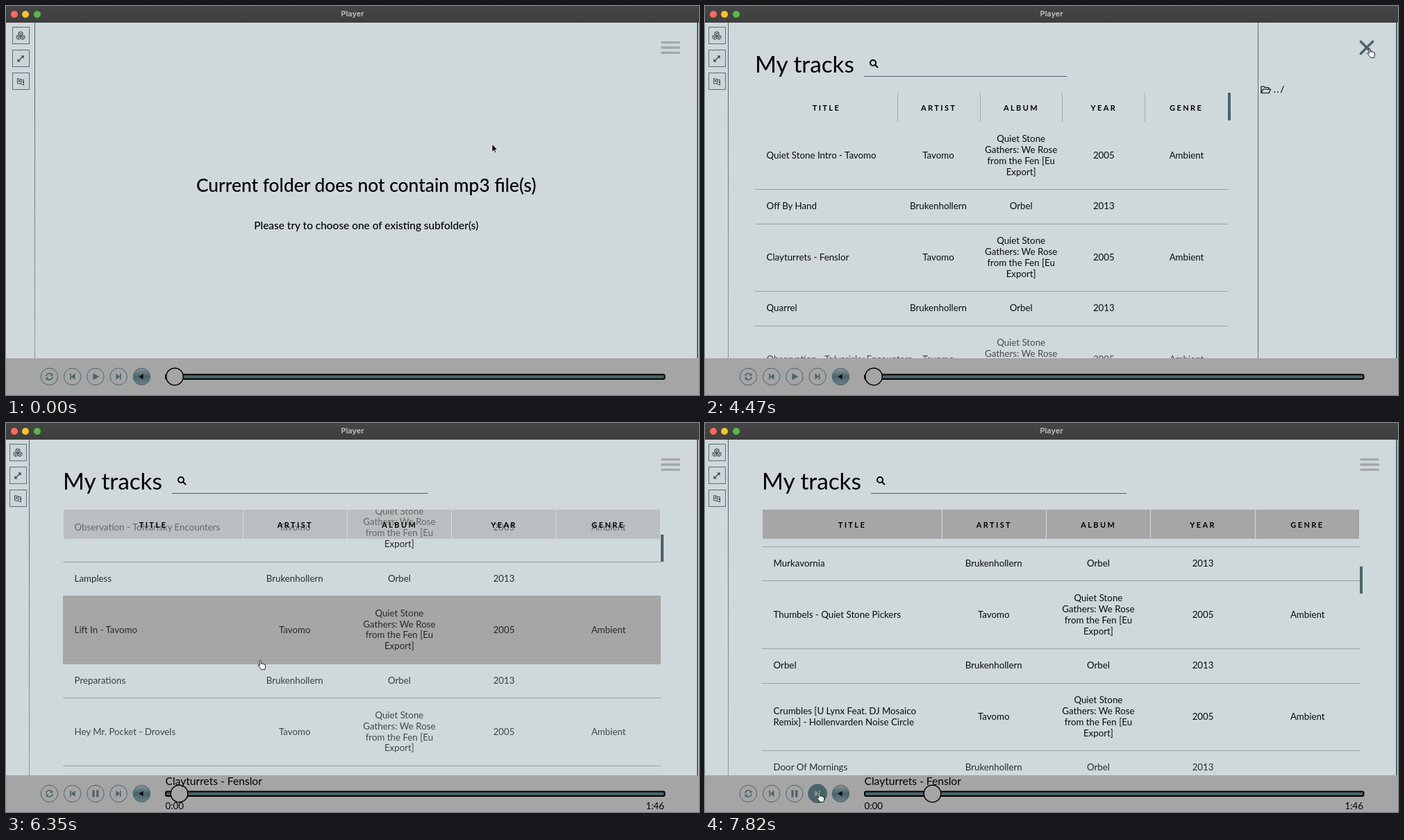
Recreate the animation shown at these times as an HTML page. Size 998 by 561 pixels, loop 8000 ms.

```html
<!DOCTYPE html>
<html lang="en">
<head>
<meta charset="utf-8">
<title>Player</title>
<style>
  html, body { margin: 0; width: 100%; height: 100%; overflow: hidden; }
  body { --dark: #4a646b; --grey: #a6a6a6; --bg: #cfd8db; font: 13.3px/15.9px Lato, sans-serif; color: #000; }
  div, svg { position: absolute; box-sizing: border-box; }
  #stage { width: 998px; height: 561px; background: var(--bg); overflow: hidden; }
  #bar { width: 998px; height: 23.5px; background: linear-gradient(#464646, #3e3e3e); color: #c2c2c2;
    font: 600 11px/23px Inter, sans-serif; text-align: center; }
  #bar i { position: absolute; top: 6.6px; width: 10.4px; height: 10.4px; border-radius: 50%; }
  #side { top: 24px; height: 484px; border-right: 1px solid; border-image: linear-gradient(var(--dark), #8f9a9d) 1; }
  #side div { left: 50%; margin-left: -12px; width: 25px; height: 25px; border: 1px solid #5a7077; background: #ccd5d8; }
  #side svg { left: 4.5px; top: 4.5px; }
  #edge { left: 995px; top: 23.5px; width: 2px; height: 485px; background: var(--dark); }
  #empty { left: 42px; text-align: center; font-weight: 500; white-space: nowrap; }
  #empty div { width: 100%; }
  #panel { top: 23.5px; height: 485px; overflow: hidden; border-left: 1px solid #5c7076; background: var(--bg); }
  .item { left: 0; width: 100%; height: 24.1px; padding-left: 22.4px; font-weight: 500; line-height: 23.6px; white-space: nowrap; }
  .item.on { background: var(--dark); color: #fff; }
  .item svg { left: 3px; top: 6px; }
  #heading { top: 63px; font-size: 33.25px; line-height: 40px; white-space: nowrap; }
  #search { top: 74px; height: 28px; border-bottom: 1px solid var(--dark); }
  #table { top: 125px; height: 383px; overflow: hidden; }
  .row { left: 0; width: 100%; display: grid; grid-template-columns: 30% repeat(4, 17.5%); align-items: center;
    text-align: center; padding: 16.4px 0; border-bottom: 1px solid #9ba1a3; white-space: nowrap; }
  .row.on { background: var(--grey); }
  .row span:first-child { text-align: left; padding-left: 16.5px; }
  #head { left: 1px; right: 1px; height: 42px; display: grid; grid-template-columns: 30% repeat(4, 17.5%); text-align: center;
    font-size: 11px; font-weight: 700; letter-spacing: 2.4px; line-height: 43px; }
  #head span + span { height: 42px; border-left: 1px solid var(--sep); }
  #thumb { width: 3.5px; height: 39.5px; background: var(--dark); }
  #foot { top: 508px; width: 998px; height: 53px; background: #a5a5a5; }
  #song { left: 229.5px; top: -1px; font-size: 15.6px; line-height: 19px; }
  #time, #total { top: 36.5px; left: 229.5px; }
  #total { left: auto; right: 50px; }
  #over { left: 0; top: 0; }
</style>
</head>
<body>
<div id="stage">
  <div id="empty">
    <div style="top:242px;font-size:26.4px;line-height:32px">Current folder does not contain mp3 file(s)</div>
    <div style="top:307px;font-size:15.45px;line-height:18.5px">Please try to choose one of existing subfolder(s)</div>
  </div>
  <div id="tracks">
    <div id="heading">My tracks</div>
    <div id="search"><svg width="30" height="28" fill="none" stroke="#000" stroke-width="2"><circle cx="13" cy="8" r="4"/><path d="M16 11l4 4"/></svg></div>
    <div id="table"><div id="rows" style="width:100%"></div>
      <div id="head"><span>TITLE</span><span>ARTIST</span><span>ALBUM</span><span>YEAR</span><span>GENRE</span></div></div>
    <div id="thumb"></div>
  </div>
  <div id="side"></div>
  <div id="panel"></div>
  <div id="edge"></div>
  <div id="bar">Player<i style="left:6.5px;background:#fe6a5e"></i><i style="left:23px;background:#fbc02e"></i><i style="left:39.5px;background:#58b947"></i></div>
  <div id="foot">
    <svg id="controls" width="998" height="53"></svg>
    <div id="song">Clayturrets - Fenslor</div><div id="time">0:00</div><div id="total">1:46</div>
  </div>
  <svg id="over" width="998" height="561">
    <g id="burger" stroke-width="3.4" stroke-linecap="round"><path d="M-12.3 0h24.6"/><path d="M-12.3 0h24.6"/><path d="M-12.3 0h24.6"/></g>
    <path id="arrow" d="M0 0v11.5l2.7-2.4 1.8 4 1.7-.8-1.8-3.8h3.4z" fill="#000" stroke="#fff" stroke-width=".8"/>
    <path id="hand" d="M0 1.2q1-2 2 0l.6 4.3 1-.7 1 .9 1.3-.5.8 1 1.4 0 .7 2.8-.7 3-.2 1.6H2.6L.4 10.4-2.2 7.6q.2-1.3 1.5-.6l1.3 1z" fill="#fff" stroke="#111" stroke-width=".9"/>
  </svg>
</div>
<script>
const $ = id => document.getElementById(id);
const clamp = x => Math.min(1, Math.max(0, x));
const smooth = x => x * x * (3 - 2 * x);
const ease = x => 1 - Math.pow(1 - clamp(x), 2.6);

// Interpolates [time, value...] points.
function track(points, t, curve = x => x) {
  const i = points.findIndex(p => p[0] > t);
  if (i === 0) return points[0].slice(1);
  if (i < 0) return points[points.length - 1].slice(1);
  const a = points[i - 1], b = points[i], k = curve((t - a[0]) / (b[0] - a[0]));
  return a.slice(1).map((v, j) => v + (b[j + 1] - v) * k);
}

const PAGE = 3950, PLAY = 5450, NEXT = 7680;
const TALL = 97.4, SHORT = 49.7, PAIR = TALL + SHORT;
const cursorPath = [[880, 700, 199], [1500, 964, 58], [1760, 964, 58], [2060, 850, 387], [2110, 850, 387], [2240, 850, 240],
  [2530, 850, 240], [2950, 840, 197], [3410, 840, 197], [3480, 838, 207], [3700, 842, 144], [4000, 842, 144], [4500, 957, 60],
  [4760, 957, 60], [5230, 370, 329], [5410, 370, 329], [5590, 365, 342], [7000, 365, 342], [7600, 163, 533]];
const scrollPath = [[6060, 0], [6150, 140], [6350, 358], [6600, 490], [6820, 577], [7100, 700], [7400, 790], [7650, 821.7]];
const cursorAt = t => track(cursorPath, t, smooth);
const scrollAt = t => track(scrollPath, t)[0];

// Folder lists with the time each one appears
const lists = [
  [0, "Applications Desktop Documents Downloads Library Movies Music Pictures Postman Public getting-started"],
  [2110, ".git .husky app build config node_modules public"],
  [3050, "assets client server"],
  [PAGE, ""]
].map(([t, s]) => [t, ["../", ...s.split(" ").filter(Boolean)]]);

const titles = ["Quiet Stone Intro - Tavomo", "Off By Hand", "Clayturrets - Fenslor", "Quarrel",
  "Observation - Tolvarisky Encounters", "Lampless", "Lift In - Tavomo", "Preparations", "Hey Mr. Pocket - Drovels",
  "Abrasions", "Stair - Brown Ferns", "Murkavornia", "Thumbels - Quiet Stone Pickers", "Orbel",
  "Crumbles [U Lynx Feat. DJ Mosaico<br>Remix] - Hollenvarden Noise Circle", "Door Of Mornings"];
const album = "Quiet Stone<br>Gathers: We Rose<br>from the Fen [Eu<br>Export]";

const rows = titles.map((title, i) => {
  const odd = i % 2, top = 42.5 + (i >> 1) * PAIR + odd * TALL, height = odd ? SHORT : TALL;
  const cells = odd ? [title, "Brukenhollern", "Orbel", 2013, ""] : [title, "Tavomo", album, 2005, "Ambient"];
  const el = document.createElement("div");
  el.className = "row";
  el.style.cssText = `top:${top}px;height:${height}px`;
  el.innerHTML = cells.map(c => `<span>${c}</span>`).join("");
  $("rows").append(el);
  let enter = PAGE;
  while (enter < 8000 && scrollAt(enter) + 383 < top + height / 2) enter += 20;
  return { el, top, height, enter };
});

const cube = (x, y) => `<path d="M${x} ${y - 3.2}l3 1.5v3.3l-3 1.6-3-1.6v-3.3zM${x - 3} ${y - 1.7}l3 1.5 3-1.5M${x} ${y - .2}v3.2"/>`;
const sideIcons = [cube(7, 4) + cube(4, 9) + cube(10, 9),
  '<path d="M3.5 10.5l7-7M7.5 3h3.5v3.5M3 7.5v3.5h3.5" stroke-width="1.2"/>',
  '<path d="M2.5 2.5l5 1v7l-5-1zM7.5 4.5h4v7.5l-4-1.5"/><path d="M4 7.5l1-3 1 3M9 7h1.5v2"/>'];
$("side").innerHTML = sideIcons.map((s, i) =>
  `<div style="top:${6 + 33.2 * i}px"><svg width="14" height="14" fill="none" stroke="#333e42" stroke-width=".9">${s}</svg></div>`).join("");

const folder = '<svg width="16" height="12" fill="none" stroke="currentColor" stroke-width="1.1" stroke-linejoin="round"><path d="M1 10.5V1.8q0-.8.8-.8h3l1.5 1.5h4.9q.8 0 .8.8V5M1 10.5l2.7-5.5h11l-2.7 5.5z"/></svg>';

const icons = [
  '<path d="M-4.5-.5a4.5 4.5 0 0 1 8.3-2M4.5.5a4.5 4.5 0 0 1-8.3 2" fill="none" stroke="#4a646b" stroke-width="1.5"/><path d="M4.8-5v4H1zM-4.8 5V1H-1z"/>',
  '<path d="M-3.5-4.5h1.7v9h-1.7zM3.8-4.5v9L-2 0z"/>',
  '', '<path d="M3.5-4.5H1.8v9h1.7zM-3.8-4.5v9L2 0z"/>',
  '<path d="M-3-1.5h2L2-4v8L-1 1.5h-2z" fill="#000"/>'];
const playIcon = '<path d="M-3.5-5L5.5 0l-9 5z"/>';
const pauseIcon = '<path d="M-4.5-5h3.3V5h-3.3zM1.2-5h3.3V5H1.2z"/>';

function drawControls(t) {
  const knob = t < 6060 ? 243 : track([[7650, 249.5], [7820, 327.5]], t)[0];
  $("controls").innerHTML =
    `<defs><linearGradient id="mute" x2="0" y2="1"><stop stop-color="#87979b"/><stop offset=".5" stop-color="#4a646b"/><stop offset="1" stop-color="#6d8187"/></linearGradient></defs>` +
    icons.map((icon, i) => {
      const on = i === 3 && t >= NEXT;
      const fill = on ? "#4a646b" : i === 4 ? "url(#mute)" : "none";
      const shape = i === 2 ? (t < PLAY ? playIcon : pauseIcon) : icon;
      return `<g transform="translate(${62.4 + 33.25 * i} 26.5)"><circle r="${on ? 13.5 : 12.2}" fill="${fill}" stroke="#4a646b"/><g fill="${on ? "#8b989c" : "#4a646b"}">${shape}</g></g>`;
    }).join("") +
    `<rect x="230" y="23.5" width="718.5" height="6.5" rx="2" fill="#4a646b" stroke="#000" stroke-width="2"/>` +
    `<circle cx="${knob}" cy="26.5" r="12.3" fill="#a5a5a5" stroke="#000" stroke-width="1.5"/>`;
}

function drawPanel(t, left, cx, cy) {
  const panel = $("panel");
  panel.style.left = left + "px";
  panel.style.width = 995.5 - left + "px";
  panel.style.display = left < 995 ? "" : "none";
  const names = lists.filter(l => l[0] <= t).pop()[1];
  const over = cx > left ? Math.floor((cy - 109.4) / 24.1) : -1;
  panel.innerHTML = names.map((n, i) =>
    `<div class="item${i === over ? " on" : ""}" style="top:${85.9 + 24.1 * i}px;${i ? "" : "letter-spacing:1.5px"}">${folder}${n}</div>`).join("");
}

function drawTracks(t, left, cx, cy) {
  const space = left - 34, x = 34 + space * .05, width = space * .9 - 4.3, scroll = scrollAt(t);
  const place = (id, l, w) => { $(id).style.left = l + "px"; if (w) $(id).style.width = w + "px"; };
  place("heading", x);
  place("search", x + 157, space * .383);
  place("table", x, width);
  place("thumb", x + width + .3);
  $("thumb").style.top = 125 + scroll * .0995 + "px";
  $("rows").style.top = -scroll + "px";
  // Hover is refreshed only now and then while scrolling.
  const seen = t < 6100 ? scroll : scrollAt(6100 + Math.floor((t - 6100) / 250) * 250);
  const inside = cx > x && cx < x + width && cy > 167 && cy < 508;
  const y = cy - 125 + seen;
  for (const r of rows) {
    r.el.classList.toggle("on", inside && y >= r.top && y < r.top + r.height);
    r.el.style.color = `rgba(0,0,0,${.65 + .3 * clamp((t - r.enter) / 500)})`;
  }
  const h = clamp((t - 6080) / 540);
  $("head").style.background = `rgba(166,166,166,${h})`;
  $("head").style.setProperty("--sep", h ? "#d3dcdf" : "#a5acae");
}

function drawBurger(p, cx, cy) {
  const hover = Math.abs(cx - 957) < 18 && Math.abs(cy - 60) < 18;
  $("burger").setAttribute("stroke", hover ? "#4a646b" : "#a6a6a6");
  [...$("burger").children].forEach((line, i) => {
    const s = i - 1;
    line.setAttribute("transform", `translate(${957 - 4 * p} ${60 + 7.4 * s * (1 - p)}) rotate(${-45 * s * p})`);
    line.setAttribute("opacity", s ? 1 : 1 - p);
  });
}

function draw(t) {
  const [cx, cy] = cursorAt(t);
  const open = ease((t - 1520) / 300) - ease((t - 4740) / 300);
  const left = 995.5 - 200 * open, list = t >= PAGE;
  $("empty").style.display = list ? "none" : "";
  $("empty").style.width = left - 42 + "px";
  $("tracks").style.display = list ? "" : "none";
  $("side").style.width = (list ? 34 : 42.3) + "px";
  drawPanel(t, left, cx, cy);
  if (list) drawTracks(t, left, cx, cy);
  drawControls(t);
  for (const id of ["song", "time", "total"]) $(id).style.display = t < PLAY ? "none" : "";
  drawBurger(open, cx, cy);
  $("arrow").style.display = t < 1450 ? "" : "none";
  $("hand").style.display = t < 1450 ? "none" : "";
  for (const id of ["arrow", "hand"]) $(id).setAttribute("transform", `translate(${cx} ${cy})`);
}

function frame() {
  draw(performance.now() % 8000);
  requestAnimationFrame(frame);
}
frame();
</script>
</body>
</html>
```
